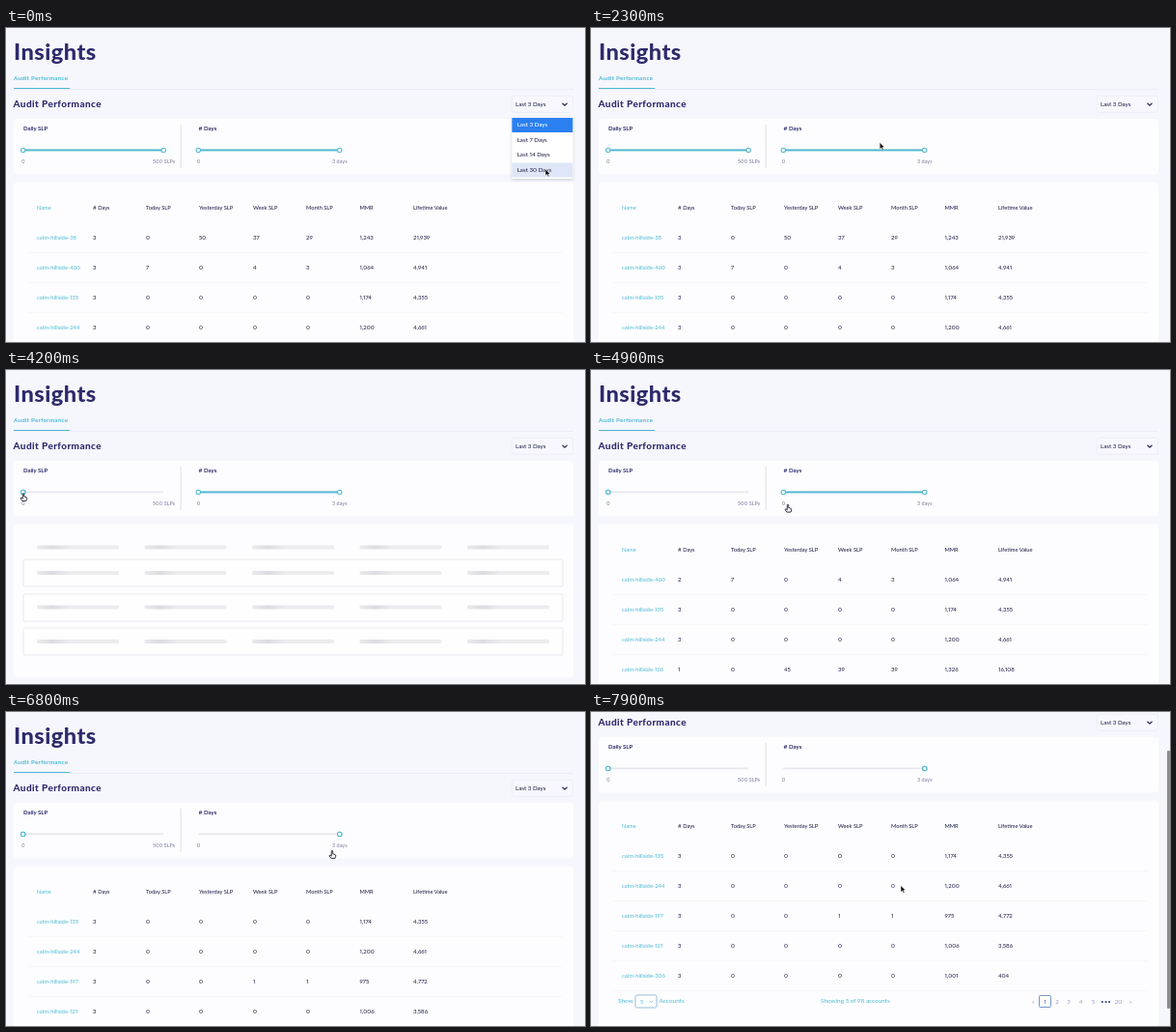
An HTML page that plays this animation: 600x325 px, repeating every 8000 ms.

```html
<!DOCTYPE html>
<html lang="en">
<head>
<meta charset="utf-8">
<title>Insights</title>
<style>
  html, body { margin: 0; width: 100%; height: 100%; overflow: hidden; background: #f6f6fd; }
  svg { display: block; font-family: Lato, "Open Sans", sans-serif; font-variant-numeric: proportional-nums; }
  text { white-space: pre; }
  .card { fill: #fdfdff; }
  .handle { fill: #fff; stroke: #55b9d2; stroke-width: 1.1; }
</style>
</head>
<body>
<svg id="stage" width="600" height="325" viewBox="0 0 600 325"></svg>
<script>
const LOOP = 8000;
const NAVY = '#2d2a6b', INK = '#28284f', TEAL = '#4cb9d2', MUTED = '#9798b4';
const COLS = [32, 90, 145, 200, 256, 311, 366.5, 422];
const HEAD = ['Name', '# Days', 'Today SLP', 'Yesterday SLP', 'Week SLP', 'Month SLP', 'MMR', 'Lifetime Value'];

const text = (x, y, s, size = 5.9, fill = NAVY, weight = 400, extra = '') =>
  `<text x="${x}" y="${y}" font-size="${size}" fill="${fill}" font-weight="${weight}" ${extra}>${s}</text>`;
const rect = (x, y, w, h, fill, extra = '') =>
  `<rect x="${x}" y="${y}" width="${w}" height="${h}" fill="${fill}" ${extra}/>`;
const chevron = (x, y, r, color, w) =>
  `<path d="M${x - r} ${y - r / 2}l${r} ${r}l${r} ${-r}" fill="none" stroke="${color}" stroke-width="${w}"/>`;

const rowSets = [
  ['38 3 0 50 37 29 1,243 21,939', '460 3 7 0 4 3 1,064 4,941', '135 3 0 0 0 0 1,174 4,355', '244 3 0 0 0 0 1,200 4,661'],
  ['460 2 7 0 4 3 1,064 4,941', '135 3 0 0 0 0 1,174 4,355', '244 3 0 0 0 0 1,200 4,661', '166 1 0 45 39 39 1,326 16,108'],
  ['135 3 0 0 0 0 1,174 4,355', '244 3 0 0 0 0 1,200 4,661', '197 3 0 0 1 1 975 4,772', '121 3 0 0 0 0 1,006 3,586', '306 3 0 0 0 0 1,001 404']
];

function table(rows) {
  let out = HEAD.map((s, i) => text(COLS[i], 187.6, s, 5.7, i ? INK : TEAL, i ? 500 : 400)).join('');
  rows.forEach((row, r) => {
    const y = 219 + r * 31;
    row.split(' ').forEach((s, i) => {
      out += i ? text(COLS[i], y, s, 6, INK, 500) : text(COLS[0], y, 'calm-hillside-' + s, 5.9, TEAL);
    });
    out += rect(22, y + 13, 555, .6, '#f3f3f9');
  });
  return out;
}

function skeleton() {
  let out = [196, 232, 267].map(y =>
    rect(18, y, 559, 28, '#fefeff', 'rx="2" stroke="#f1f1f5" stroke-width="1.7"')).join('');
  for (const y of [181.5, 208, 243.5, 279])
    for (let c = 0; c < 5; c++)
      out += rect(32 + c * 111.5, y, 85, 4, `url(#shine${c})`, 'rx="1.5"');
  return out;
}

const slider = (id, x0, x1) =>
  rect(x0, 125.5, x1 - x0, 1.8, '#e6e6ee') +
  `<rect id="${id}Fill" y="125.5" height="1.9" fill="${TEAL}"/>
   <circle id="${id}Halo" cy="126.5" r="9" fill="#58a3c1" opacity=".25"/>
   <circle id="${id}A" class="handle" cx="${x0}" cy="126.5" r="2.2"/>
   <circle id="${id}B" class="handle" cx="${x1}" cy="126.5" r="2.2"/>
   <text id="${id}Value" y="116.5" font-size="6" fill="#5a9fbd" text-anchor="middle"></text>`;

const footer = () =>
  text(28, 369, 'Show', 6.5, TEAL) +
  rect(46, 361, 22, 13, '#fff', 'rx="1.5" stroke="#7badd0" stroke-width=".8"') +
  text(51, 369.6, '5', 6, TEAL) + chevron(62.5, 367.7, 2, '#7badd0', .8) +
  text(70.5, 369, 'Accounts', 6.5, TEAL) + text(238, 369, 'Showing 5 of 98 accounts', 6.4, TEAL) +
  rect(464.5, 361.5, 12, 12, '#fff', 'rx="1" stroke="#6189bf" stroke-width=".9"') +
  [['‹', 458], ['1', 470.5], ['2', 483], ['3', 495], ['4', 507.5], ['5', 520.5], ['•••', 533.5], ['20', 546.5], ['›', 559]]
    .map(([s, x]) => text(x, 369.6, s, 6.2, /[1‹›•]/.test(s) ? '#41549b' : MUTED, 400, 'text-anchor="middle"')).join('');

const options = ['Last 3 Days', 'Last 7 Days', 'Last 14 Days', 'Last 30 Days'];

stage.innerHTML = `
<defs>
  <filter id="soft" x="-20%" y="-20%" width="140%" height="140%">
    <feDropShadow dx="0" dy="1" stdDeviation="1.5" flood-color="#445" flood-opacity=".25"/>
  </filter>
  ${[0, 1, 2, 3, 4].map(c => `<linearGradient id="shine${c}" class="shine" gradientUnits="userSpaceOnUse" x1="0" x2="36">
    <stop offset="0" stop-color="#ececef"/><stop offset=".5" stop-color="#dcdce0"/><stop offset="1" stop-color="#ececef"/>
  </linearGradient>`).join('')}
</defs>
${rect(0, 0, 600, 325, '#f6f6fd')}
<g id="page">
  ${text(8, 33, 'Insights', 23.6, NAVY, 800, 'letter-spacing=".45"')}
  ${text(8, 54, 'Audit Performance', 6.2, TEAL, 700, 'letter-spacing=".25"')}
  ${rect(8, 63, 580, .6, '#e4e8f2')}${rect(8, 62, 58, 1, TEAL)}
  ${text(7.5, 81.8, 'Audit Performance', 10, NAVY, 800, 'letter-spacing=".4"')}
  ${rect(524.3, 70.3, 63, 17, '#f7f7fd', 'rx="2" stroke="#eaebf3" stroke-width=".7"')}
  ${text(528, 81, 'Last 3 Days', 6.2, INK, 500)}${chevron(579, 79, 2.5, INK, 1.1)}
  <rect class="card" x="8" y="94" width="580" height="57.5" rx="4"/>
  ${text(18, 106, 'Daily SLP', 6, NAVY, 700)}${text(199.5, 106, '# Days', 6.1, NAVY, 700)}
  ${rect(180.7, 100, .9, 45, '#d9d9e4')}
  ${text(16, 140, '0', 5.3, MUTED, 700)}${text(152, 140, '500 SLPs', 5.3, MUTED, 700, 'letter-spacing=".1"')}
  ${text(197.7, 140, '0', 5.3, MUTED, 700)}${text(338, 140, '3 days', 5.3, MUTED, 700, 'letter-spacing=".1"')}
  ${slider('slp', 17.7, 163.2)}${slider('days', 199.3, 345.7)}
  <rect id="panel" class="card" x="8" y="159.5" width="580" rx="4"/>
  <g id="body"></g>
  <g id="menu">
    ${rect(524.3, 92.5, 63, 63.5, '#fff', 'filter="url(#soft)"')}
    <rect id="hover" x="524.3" width="63" height="15" fill="#dfe6f7"/>
    ${rect(524.3, 93, 63, 15, '#2b80f0')}
    ${options.map((s, i) => text(529.7, 102.4 + i * 15.5, s, 6.2, i ? INK : '#fff', 500)).join('')}
  </g>
</g>
<rect id="bar" x="597" width="3" height="267" rx="1" fill="#8b8b90"/>
<circle id="ring" r="14.4" cy="128" fill="#e9808c" fill-opacity=".08" stroke="#e08592" stroke-width="1.6"/>
<path id="arrow" d="M0 0V7L1.7 5.5L2.8 8L4 7.5L2.9 5.1H5Z" fill="#111" stroke="#fff" stroke-width=".5"/>
<path id="hand" d="M-.7 0Q0-.8.7 0V3L3.1 3.7Q4 4 3.7 5.4L3 7.6H-1.1L-2.8 5.2Q-3 4-1.9 4.3L-.7 5.3Z" fill="#f4f4f8" stroke="#25252f" stroke-width=".9"/>`;

const el = id => document.getElementById(id);
const set = (id, attrs) => { for (const k in attrs) el(id).setAttribute(k, attrs[k]); };
const show = (id, on) => { el(id).style.display = on ? '' : 'none'; };
const clamp = (v, a, b) => Math.min(b, Math.max(a, v));
const within = (t, a, b) => t >= a && t < b;

const slpDrag = t => within(t, 2750, 3950);
const daysDrag = t => within(t, 5950, 6680);

// Pointer tip: time, x, y
const path = [
  [0, 559, 146], [250, 559, 146], [800, 552, 102], [1850, 552, 102], [2600, 163, 127.2], [2780, 163, 127.2],
  [3300, 78.4, 127.2], [3850, 17.7, 127.2], [4250, 18, 128], [4880, 204, 139.5], [5450, 204, 139.5],
  [5800, 199, 127], [6000, 199, 127], [6100, 212.5, 126.5], [6600, 346, 127], [6680, 346, 127],
  [7000, 321, 179.5], [LOOP, 321, 179.5]
];
function pointer(t) {
  const i = path.findIndex(p => p[0] > t);
  const [a, b] = [path[i - 1], path[i]];
  let p = (t - a[0]) / (b[0] - a[0]);
  if (!slpDrag(t) && !daysDrag(t)) p *= p * (3 - 2 * p);
  return [a[1] + (b[1] - a[1]) * p, a[2] + (b[2] - a[2]) * p];
}

function setSlider(id, low, high, active, value) {
  set(id + 'Fill', { x: low, width: Math.max(0, high - low) });
  set(id + 'A', { cx: low });
  set(id + 'B', { cx: high });
  const x = id === 'slp' ? high : low;
  set(id + 'Halo', { cx: x });
  set(id + 'Value', { x });
  el(id + 'Value').textContent = value;
  show(id + 'Halo', active);
  show(id + 'Value', active);
}

let shown;
function frame(now) {
  const t = now % LOOP;
  const [x, y] = pointer(t);
  const scroll = clamp((t - 7195) * .097, 0, 68);
  const loading = within(t, 1050, 1780) || within(t, 4100, 4700);
  const state = loading ? 'loading' : t < 4100 ? 0 : t < 6700 ? 1 : 2;

  if (state !== shown) {
    shown = state;
    el('body').innerHTML = loading ? skeleton() : table(rowSets[state]) + footer();
    set('panel', { height: loading ? 159 : 240 });
  }
  document.querySelectorAll('.shine').forEach((g, c) => {
    const shift = (t - 770) % 1500 * .115 - 51.5;
    g.setAttribute('gradientTransform', `translate(${32 + c * 111.5 + shift})`);
  });

  const high = t < 2750 ? 163.2 : slpDrag(t) ? clamp(x, 17.7, 163.2) : 17.7;
  setSlider('slp', 17.7, high, slpDrag(t), Math.round((high - 17.7) / 145.5 * 500));
  const day = t < 5950 ? 0 : daysDrag(t) ? clamp(Math.round((x - 199.3) / 48.8), 0, 3) : 3;
  setSlider('days', 199.3 + day * 48.8, 345.7, daysDrag(t), day);

  show('menu', t < 1000);
  set('hover', { y: 93 + clamp(Math.floor((y - 93) / 15.5), 0, 3) * 15.5 });

  set('page', { transform: `translate(0 ${-scroll})` });
  show('bar', t >= 7200);
  set('bar', { y: 5 + (scroll - 20) * .73 });

  show('ring', slpDrag(t) || daysDrag(t));
  set('ring', { cx: pointer(Math.max(0, t - 10))[0] });

  const hand = within(t, 2550, 6850);
  show('hand', hand);
  show('arrow', !hand);
  set(hand ? 'hand' : 'arrow', { transform: `translate(${x} ${y})` });
  requestAnimationFrame(frame);
}
requestAnimationFrame(frame);
</script>
</body>
</html>
```
